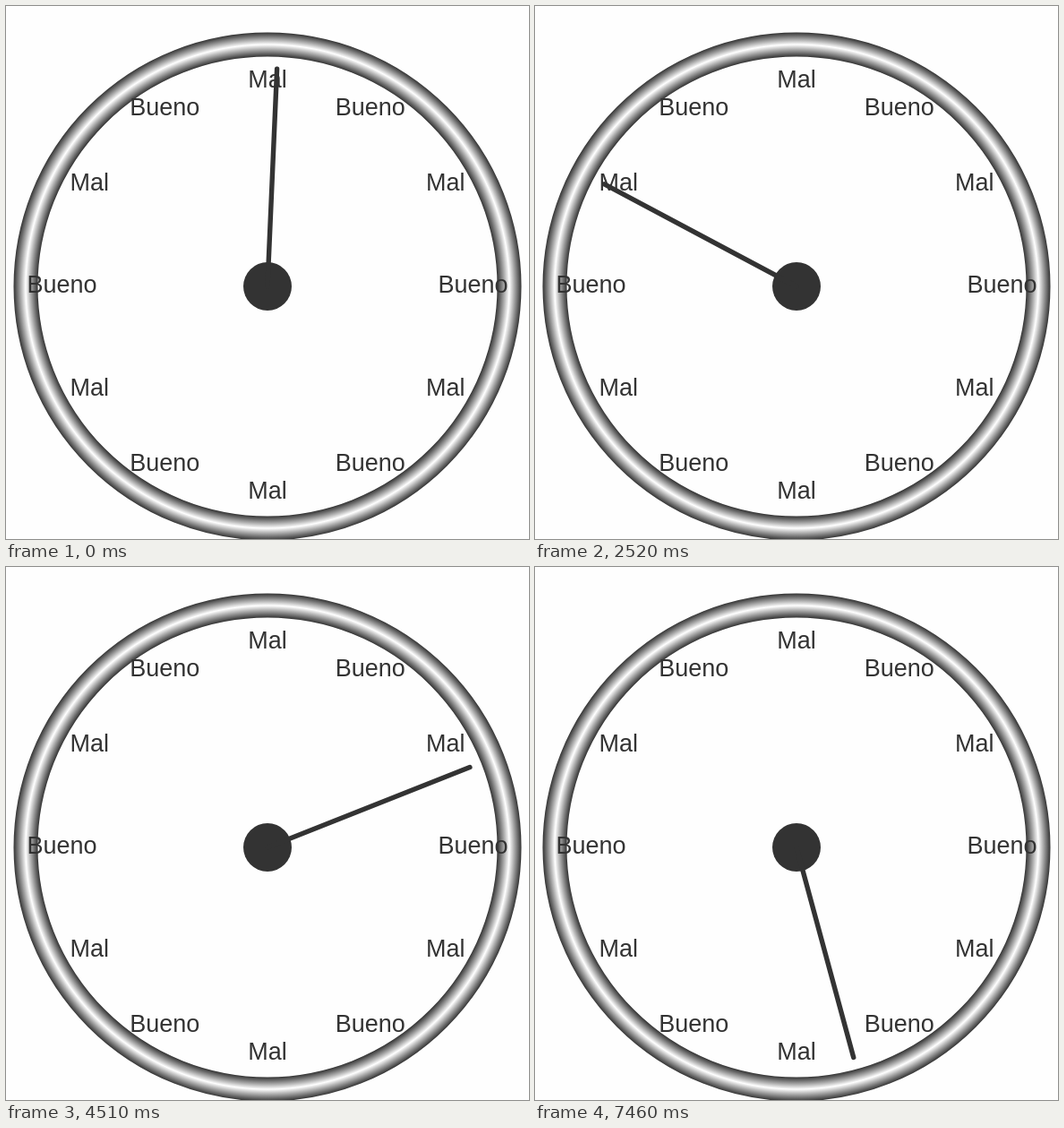
An HTML page with a canvas for the animation above (8 s loop, 584 px wide and 595 px high).

```html
<!DOCTYPE html>
<html lang="es">
<head>
<meta charset="utf-8">
<style>
html, body { margin: 0; width: 100%; height: 100%; overflow: hidden; background: #fefefe; }
canvas { display: block; }
</style>
</head>
<body>
<canvas id="dial" width="584" height="595"></canvas>
<script>
const ctx = document.getElementById('dial').getContext('2d');
const R = 270, LOOP = 8000, INK = '#333';

// [start ms, hand angle in degrees clockwise from the top]
const steps = [
  [0, 2.5], [410, 165], [1530, 262.2], [2520, 298], [3490, 103.1],
  [4510, 68.4], [5500, 62.3], [6460, 326.5], [7460, 164.8]
];

const rim = ctx.createRadialGradient(0, 0, R * 0.95, 0, 0, R * 1.05);
rim.addColorStop(0, INK);
rim.addColorStop(0.5, '#fff');
rim.addColorStop(1, INK);

function circle(r) {
  ctx.beginPath();
  ctx.arc(0, 0, r, 0, Math.PI * 2);
}

function drawFace() {
  circle(R);
  ctx.strokeStyle = rim;
  ctx.lineWidth = R * 0.1;
  ctx.stroke();

  circle(R * 0.1);
  ctx.fillStyle = INK;
  ctx.fill();

  ctx.font = R * 0.1 + 'px "Liberation Sans", Arial, sans-serif';
  ctx.textAlign = 'center';
  ctx.textBaseline = 'middle';
  for (let i = 0; i < 12; i++) {
    const a = i * Math.PI / 6;
    ctx.fillText(i % 2 ? 'Bueno' : 'Mal', R * 0.85 * Math.sin(a), -R * 0.85 * Math.cos(a));
  }
  // the quarter positions of the dial hold "Bueno" on the sides
}

function drawHand(deg) {
  const a = deg * Math.PI / 180;
  ctx.beginPath();
  ctx.moveTo(0, 0);
  ctx.lineTo(R * 0.9 * Math.sin(a), -R * 0.9 * Math.cos(a));
  ctx.strokeStyle = INK;
  ctx.lineWidth = R * 0.02;
  ctx.lineCap = 'round';
  ctx.stroke();
}

function draw(now) {
  const t = now % LOOP;
  ctx.setTransform(1, 0, 0, 1, 0, 0);
  ctx.fillStyle = '#fefefe';
  ctx.fillRect(0, 0, 584, 595);
  ctx.translate(292, 313);
  drawFace();
  drawHand(steps.findLast(s => s[0] <= t)[1]);
}

const start = performance.now();
function tick() {
  draw(performance.now() - start);
  requestAnimationFrame(tick);
}
tick();
</script>
</body>
</html>
```
